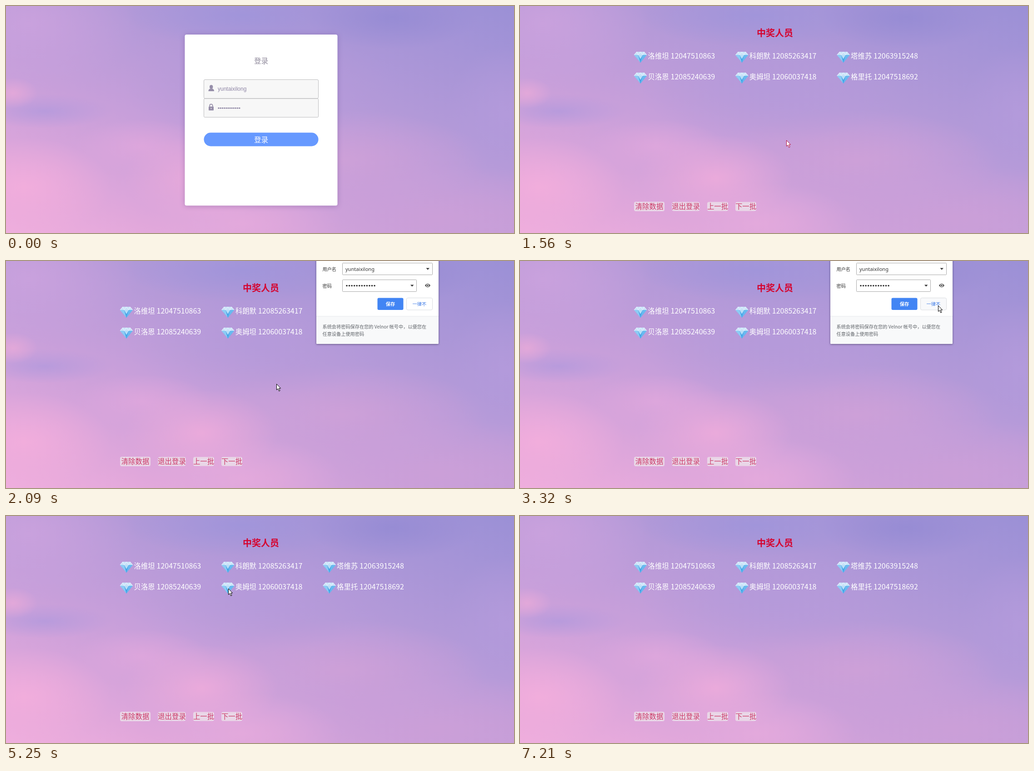
An HTML page that plays this animation: 1118 px wide and 501 px high, repeating every 8.08 s.

```html
<!DOCTYPE html>
<html lang="zh-CN">
<head>
<meta charset="utf-8">
<title>中奖人员</title>
<style>
  html, body { margin: 0; width: 100%; height: 100%; overflow: hidden; }
  body {
    background:
      radial-gradient(55px 34px at 15px 192px, #e2a8d9, #e2a8d900),
      radial-gradient(150px 38px at 85px 232px, #b89bdc, #b89bdc00),
      radial-gradient(190px 110px at 40px 400px, #f1addc, #f1addc00),
      radial-gradient(170px 95px at 430px 380px, #eaaadb, #eaaadb00),
      radial-gradient(150px 60px at 300px 310px, #dda6dc, #dda6dc00),
      radial-gradient(220px 90px at 520px 480px, #e3a9dc, #e3a9dc00),
      radial-gradient(190px 70px at 850px 25px, #978cd4, #978cd400),
      radial-gradient(260px 70px at 520px 20px, #a195da, #a195da00),
      radial-gradient(130px 150px at 1100px 240px, #b39adb, #b39adb00),
      radial-gradient(240px 150px at 50px 40px, #c9a1dd, #c9a1dd00),
      radial-gradient(300px 120px at 560px 180px, #b59ada, #b59ada00),
      radial-gradient(320px 110px at 740px 340px, #cda0d8, #cda0d800),
      radial-gradient(380px 120px at 950px 470px, #cb9fd8, #cb9fd800),
      linear-gradient(200deg, #9b90d6, #b299d8 35%, #c79fda 60%, #e0a7db 85%, #efaedd);
  }
  svg { position: absolute; left: 0; top: 0; overflow: hidden; }
  text { font-family: "Noto Sans CJK SC", "Noto Sans CJK", "Noto Sans CJK JP", sans-serif; white-space: pre; }
  .mid { text-anchor: middle; }
  .entry { font: 12px "Liberation Sans", Arial, sans-serif; fill: #8f86a6; }
  .small { font-size: 10.2px; fill: #333; }
  .user { font: 11px "Noto Sans", sans-serif; fill: #333; }
  .link { font-size: 15.4px; fill: #cc3a68; }
  .card { filter: drop-shadow(0 1px 6px #5a3c8259); }
  .bubble { filter: drop-shadow(0 1px 2px #28234699); }
</style>
</head>
<body>
<svg width="1118" height="501" viewBox="0 0 1118 501">
  <defs>
    <linearGradient id="gem" x2="0" y2="1">
      <stop offset="0" stop-color="#d5eafa"/>
      <stop offset=".35" stop-color="#a8d6f6"/>
      <stop offset=".6" stop-color="#4fabe9"/>
      <stop offset="1" stop-color="#3f9fe4"/>
    </linearGradient>
    <g id="diamond">
      <path d="M6 1H22L28 8 14 25 0 8Z" fill="url(#gem)"/>
      <path d="M6 1H22L28 8H0Z" fill="#c9e3f8"/>
      <path d="M0 8 6 1 9 8 14 1 19 8 22 1 28 8" fill="none" stroke="#f0f8ff" stroke-width=".9"/>
      <path d="M0 8H9L14 25Z" fill="#8dcbf4"/>
      <path d="M9 8H19L14 25Z" fill="#45a4e8"/>
      <path d="M9 8H19L14 17Z" fill="#b9def7"/>
      <path d="M19 8H28L14 25Z" fill="#69b9ef"/>
    </g>
  </defs>

  <g id="login">
    <rect class="card" x="393.5" y="63" width="336" height="377.5" rx="4" fill="#fff"/>
    <text class="mid" x="561.5" y="127" font-size="15.6" fill="#918b9d">登录</text>
    <g fill="#f7f7f7" stroke="#bdbdbf">
      <rect x="435.5" y="162.5" width="252" height="41.5" rx="2.5"/>
      <rect x="435.5" y="204.5" width="252" height="41" rx="2"/>
    </g>
    <g fill="#968ea9">
      <ellipse cx="451.7" cy="178.4" rx="3.7" ry="4.2"/>
      <path d="M445.5 188C445.5 184 448 182.3 451.7 182.3S458 184 458 188Z"/>
      <rect x="446" y="222" width="11" height="8.5" rx="1"/>
      <path d="M448.3 223V219.8A3.2 3.2 0 0 1 454.7 219.8V223" fill="none" stroke="#968ea9" stroke-width="1.8"/>
      <circle cx="451.5" cy="226" r="1.1" fill="#f7f7f7"/>
    </g>
    <text class="entry" x="466" y="187">yuntaixilong</text>
    <g id="loginDots" fill="#8c84a2"></g>
    <rect x="435.5" y="279.5" width="252" height="30" rx="15" fill="#69f"/>
    <text class="mid" x="561.5" y="301" font-size="15.6" fill="#fff">登录</text>
  </g>

  <g id="winners">
    <text class="mid" x="561" y="67" font-size="20" font-weight="700" fill="#d5032f">中奖人员</text>
    <g id="rows"></g>
    <g id="links"></g>
  </g>

  <g id="bubble">
    <g class="bubble">
      <path d="M683 -9H952V181Q952 183 950 183H685Q683 183 683 181Z" fill="#fff"/>
      <path d="M683 122H952V181Q952 183 950 183H685Q683 183 683 181Z" fill="#f8f9fa"/>
    </g>
    <path d="M683 122H952" stroke="#e6e8eb"/>
    <text class="small" x="696.5" y="21.5">用户名</text>
    <text class="small" x="696.5" y="58.5">密码</text>
    <g fill="#fff" stroke="#a9a9a9">
      <rect x="740.5" y="4.5" width="198" height="26" rx="1"/>
      <rect x="740.5" y="41.5" width="163" height="26" rx="1"/>
    </g>
    <text class="user" x="747" y="21.5">yuntaixilong</text>
    <g id="bubbleDots" fill="#333"></g>
    <path d="M924.5 15.5H932L928.2 19.5ZM890 52.5H897.5L893.7 56.5Z" fill="#333"/>
    <path d="M922 54Q928 46 934 54Q928 62 922 54Z" fill="#444"/>
    <circle cx="928" cy="54" r="2.4" fill="#444" stroke="#fff" stroke-width="1.2"/>
    <rect x="817.5" y="81.5" width="57" height="26.5" rx="3" fill="#4285f4"/>
    <text class="small mid" x="846" y="98.7" font-weight="700" style="fill:#fff">保存</text>
    <rect id="never" x="881.5" y="81.5" width="57" height="26.5" rx="3" stroke="#dadce0"/>
    <text class="small mid" x="909.8" y="98.7" style="fill:#3b79e6">一律不</text>
    <g style="fill:#5f6368">
      <text class="small" x="696.5" y="148.5" style="fill:inherit">系统会将密码保存在您的 Velnor 帐号中，以便您在</text>
      <text class="small" x="696.5" y="165" style="fill:inherit">任意设备上使用密码</text>
    </g>
  </g>

  <g id="click" fill="none">
    <circle cx="0" cy="0" r="9.5" stroke="#000"/>
    <circle cx="0" cy="0" r="8.5" stroke="#fff"/>
  </g>
  <g id="cursor" fill="#fff" stroke="#000" stroke-linejoin="round">
    <path id="arrow" d="M.5 .5V13.5L3.5 10.8 5.8 16.2 8 15.2 5.7 10H9.6Z"/>
    <path id="hand" d="M-1.5 11V2Q-1.5 .5 0 .5T1.5 2V7L3 6.5 4.5 7.5 6 7 7.5 8.2 9 8 10.5 9.5V14L8.5 18V20.5H-.5V18.5L-4.5 13Q-4.5 10-1.5 13Z"/>
  </g>
</svg>
<script>
const LOOP = 8080;
const $ = id => document.getElementById(id);

const people = [
  ["洛维坦", "12047510863"], ["科朗默", "12085263417"], ["塔维苏", "12063915248"],
  ["贝洛恩", "12085240639"], ["奥姆坦", "12060037418"], ["格里托", "12047518692"]
];
$("rows").innerHTML = people.map(([name, phone], i) => {
  const x = 251 + (i % 3) * 223.3, y = 100 + Math.floor(i / 3) * 46;
  return `<use href="#diamond" x="${x}" y="${y}"/>
    <text x="${x + 30.5}" y="${y + 16}" font-size="15.4" fill="#fff">${name}</text>
    <text x="${x + 80.5}" y="${y + 16}" font-size="16" fill="#fff">${phone}</text>`;
}).join("");

// label, left, top, width, height
const links = [
  ["清除数据", 251, 432, 67, 21], ["退出登录", 334.5, 432.5, 61, 20],
  ["上一批", 412, 432.5, 46, 20], ["下一批", 474, 432.5, 46, 20]
];
$("links").innerHTML = links.map(([label, x, y, w, h]) =>
  `<rect x="${x}" y="${y}" width="${w}" height="${h}" rx="4" fill="#ecdfe9" fill-opacity=".85"/>
   <text class="link mid" x="${x + w / 2}" y="448.3">${label}</text>`).join("");

function dots(id, x, y, gap, r) {
  $(id).innerHTML = Array.from({ length: 12 }, (_, i) =>
    `<circle cx="${x + i * gap}" cy="${y}" r="${r}"/>`).join("");
}
dots("loginDots", 468, 225.3, 4.17, 1.6);
dots("bubbleDots", 750, 54.5, 5.55, 1.8);

// Pointer moves: first step time, last step time, step count, path points
const moves = [
  [70, 460, 6, [731, 394], [650, 338], [601, 306], [586, 296]],
  [2090, 2710, 9, [595, 271], [700, 160], [830, 60], [885, 3], [897, 28]],
  [2860, 3400, 8, [908, 38], [925, 46], [941, 60], [938, 74], [932, 84], [925, 92], [920, 98], [918, 97]],
  [3550, 3630, 2, [917, 91], [916, 85]],
  [3860, 3940, 2, [915, 88], [915, 92]],
  [4400, 4870, 7, [890, 105], [700, 215], [560, 265], [488, 190]],
  [5100, 5100, 1, [487, 188]],
  [5250, 6040, 11, [489, 160], [492, 97], [410, 140], [322, 250], [350, 318], [412, 319]],
  [6120, 6500, 6, [428, 345], [436, 372], [434, 410], [425, 442], [404, 462], [384, 474]],
  [6670, 7210, 8, [390, 466], [470, 461], [700, 478], [955, 492], [990, 501]]
];

function pointer(t) {
  const move = moves.findLast(m => t >= m[0]);
  if (!move || t >= 7210) return null;
  const [from, to, steps, ...path] = move;
  if (steps === 1) return path[0];
  const step = Math.min(steps - 1, Math.floor((t - from) / (to - from) * (steps - 1) + .1));
  const at = step / (steps - 1) * (path.length - 1);
  const i = Math.min(path.length - 2, Math.floor(at));
  return [0, 1].map(k => Math.round(path[i][k] + (path[i + 1][k] - path[i][k]) * (at - i)));
}

const inside = (x, y, l, t, w, h) => x >= l && x <= l + w && y >= t && y <= t + h;
const between = (t, a, b) => t >= a && t < b;
const show = (id, on) => { $(id).style.display = on ? "" : "none"; };

function bubbleOpacity(t) {
  if (!between(t, 1630, 4240)) return 0;
  return t < 1710 ? .35 : t < 1780 ? .75 : 1;
}

function draw(t) {
  const onLogin = t < 1560;
  show("login", onLogin);
  show("winners", !onLogin);

  const opacity = bubbleOpacity(t);
  show("bubble", opacity > 0);
  $("bubble").style.opacity = opacity;
  $("never").setAttribute("fill", t >= 2710 ? "#f8f9fb" : "#fff");

  const pos = pointer(t);
  const clicking = between(t, 990, 1090) || between(t, 4170, 4240);
  show("cursor", pos);
  show("click", pos && clicking);
  if (!pos) return;
  const [x, y] = pos;
  const hand = onLogin
    ? inside(x, y, 436, 280, 251, 29)
    : links.some(([, ...box]) => inside(x, y, ...box));
  show("hand", hand);
  show("arrow", !hand);
  $("cursor").setAttribute("transform", `translate(${x} ${y})`);
  $("click").setAttribute("transform", `translate(${x} ${y})`);
  $("cursor").setAttribute("stroke",
    between(t, 1560, 1630) ? "#b0103c" : between(t, 4240, 4400) ? "#2f8a4a" : "#000");
}

const start = performance.now();
function tick() {
  draw((performance.now() - start) % LOOP);
  requestAnimationFrame(tick);
}
tick();
</script>
</body>
</html>
```
